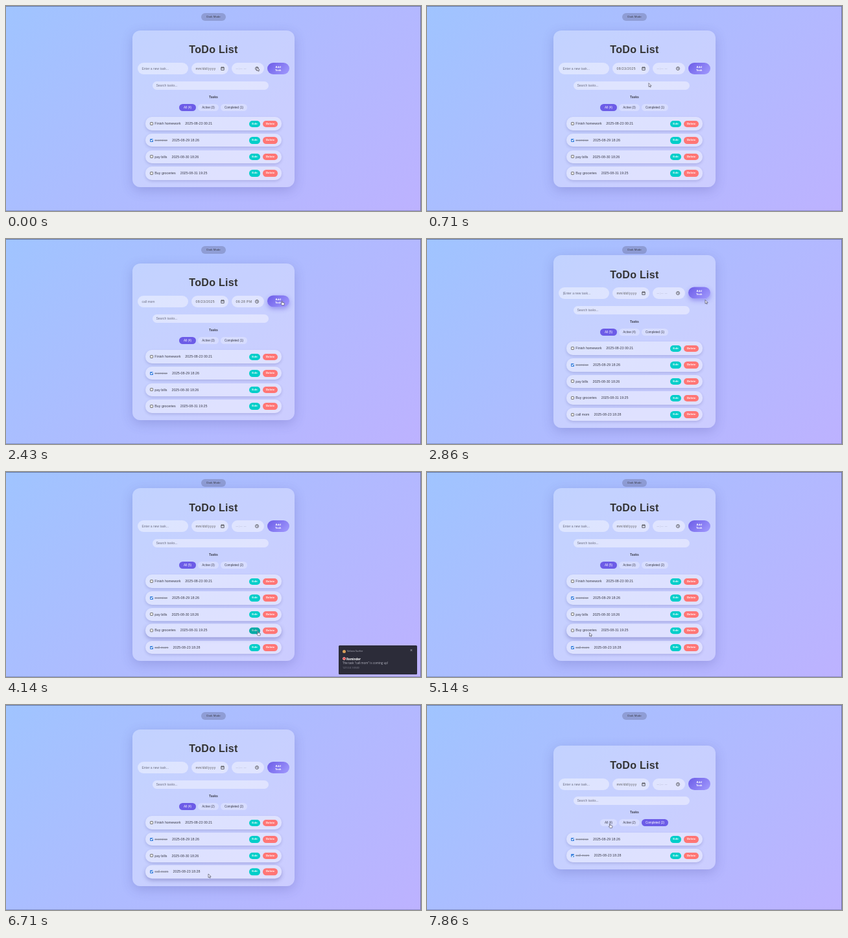
Animation of 640x318 px, one loop 8 s. Source, as an HTML page:

```html
<!DOCTYPE html>
<html lang="en">
<head>
<meta charset="utf-8">
<title>ToDo List</title>
<style>
html, body { margin: 0; width: 100%; height: 100%; overflow: hidden; }
#stage {
  position: relative; width: 640px; height: 318px; overflow: hidden; white-space: nowrap;
  background: linear-gradient(135deg, #a0c4ff, #bdb2ff);
  font: 5px "Liberation Sans", Arial, sans-serif; color: #3a3b48;
}
#stage div, #stage svg, h1 { position: absolute; box-sizing: border-box; }
.edge { inset: 0; border: solid rgba(40, 50, 90, .5); border-width: 1px 1px 1px 0; border-bottom-color: rgba(40, 50, 90, .3); }
.mode {
  left: 301px; top: 11px; width: 38px; height: 12px; border-radius: 6px;
  background: #8f9dd5; font-size: 4.4px; line-height: 12px; text-align: center;
}
#panel {
  left: 195px; width: 250px; border-radius: 12px;
  background: rgba(248, 249, 255, .33);
  box-shadow: 0 5px 18px rgba(60, 60, 140, .22);
}
h1 {
  margin: 0; left: 0; width: 250px; top: 20.9px; text-align: center;
  font-size: 16px; line-height: 20px; letter-spacing: .3px; color: #333;
}
.field {
  height: 18px; line-height: 18px; border-radius: 9px; padding-left: 6.5px;
  background: rgba(250, 250, 255, .46); color: #6d7085;
}
#task { left: 8px; top: 50.5px; width: 78px; }
#date { left: 91px; top: 50.5px; width: 57px; letter-spacing: .45px; color: #555; }
#time { left: 153px; top: 50.5px; width: 50px; letter-spacing: .45px; color: #555; }
#time.empty { color: #a0a3bd; }
#search { left: 31px; top: 79px; width: 179px; height: 13px; line-height: 13px; padding-left: 5.5px; }
.icon { top: 56.5px; width: 6px; height: 6px; overflow: visible; fill: none; stroke: #444; stroke-width: .8; }
.caption { left: 0; width: 250px; top: 100px; line-height: 6px; text-align: center; font-weight: bold; }
#add {
  left: 207.5px; top: 50px; width: 34.5px; height: 18.5px; border-radius: 9.5px; padding-top: 4.2px;
  background: linear-gradient(135deg, #6c5ce7, #a29bfe); color: #fff;
  font-size: 4.3px; font-weight: bold; line-height: 5px; text-align: center;
}
#add.hover { transform: translateY(-.6px); box-shadow: 0 3px 7px rgba(90, 75, 220, .45); }
.tab {
  top: 114px; height: 11px; line-height: 11px; border-radius: 6px;
  background: rgba(255, 255, 255, .27); font-size: 4.6px; text-align: center;
}
.tab.on { background: #6c5ce7; color: #fff; }
.row {
  left: 20px; width: 210px; height: 20.6px; line-height: 20.6px; border-radius: 10px;
  background: rgba(250, 250, 255, .42); box-shadow: 0 2px 4px rgba(60, 60, 140, .2); font-size: 5.3px;
}
.row.hover { transform: translateY(-.7px); box-shadow: 0 3px 6px rgba(60, 60, 140, .34); }
.row .text { left: 14.3px; }
.row .when { margin-left: 7px; }
.row.done .name { text-decoration: line-through; color: #85889a; }
.box { left: 7.3px; top: 7.8px; width: 5px; height: 5px; border: .7px solid #777; border-radius: 1px; background: #fff; }
.done .box { border: 0; background: #3f84de; }
.done .box::after {
  content: ""; position: absolute; left: 1.7px; top: .5px; width: 1.3px; height: 2.6px;
  border: solid #fff; border-width: 0 .7px .7px 0; transform: rotate(45deg);
}
.btn { top: 5.3px; height: 10.4px; line-height: 10.4px; border-radius: 5.2px; color: #fff; font-size: 4.4px; font-weight: bold; text-align: center; }
.edit { left: 160px; width: 17px; background: #00cec9; }
.del { left: 181px; width: 23px; background: #ff7675; }
.btn.hover { filter: brightness(.82); }
#toast { left: 513px; top: 269px; width: 121px; height: 45px; background: #2c2c39; border-radius: 1.5px; color: #b9bac6; font: 4.5px/6px "Open Sans", sans-serif; }
.app { left: 5.5px; top: 6.5px; width: 5px; height: 5px; border-radius: 50%; background: #d8a05a; }
.pin { left: 6px; top: 18.3px; width: 5px; height: 5px; border-radius: 50%; background: #e5484d; border: 1px solid #f3b0b0; }
#cursor { left: 0; top: 0; width: 8px; height: 10px; overflow: visible; }
#cursor path { fill: #f4f4ff; stroke: #3a3a4a; stroke-width: .6; stroke-linejoin: round; }
</style>
</head>
<body>
<div id="stage">
  <div class="mode">Dark Mode</div>
  <div id="panel">
    <h1>ToDo List</h1>
    <div class="field" id="task"></div>
    <div class="field" id="date"></div>
    <div class="field" id="time"></div>
    <svg class="icon" style="left:135.5px" viewBox="0 0 6 6"><path d="M.8 1.2h4.4v4.2H.8zM.8 2h4.4M1.8 .3v1M4.2 .3v1"/></svg>
    <svg class="icon" style="left:189px" viewBox="0 0 6 6"><path d="M.5 3a2.5 2.5 0 1 0 5 0a2.5 2.5 0 1 0-5 0M3 1.4V3l1 .8"/></svg>
    <div id="add">Add<br>Task</div>
    <div class="field" id="search">Search tasks...</div>
    <div class="caption">Tasks</div>
  </div>
  <div id="toast">
    <div class="app"></div>
    <div style="left:13px;top:6px;font-size:4px">Velora Surfer</div>
    <div style="left:110px;top:5px;font-size:7px">×</div>
    <div class="pin"></div>
    <div style="left:12px;top:17.5px;color:#fff;font-weight:bold">Reminder</div>
    <div style="left:6px;top:24px">The task "call mom" is coming up!</div>
    <div style="left:6px;top:32px;font-size:3.8px;color:#8f909e">127.0.0.1:5500</div>
  </div>
  <svg id="cursor"><path/></svg>
  <div class="edge"></div>
</div>
<script>
const LOOP = 8000, FPS = 7, ROW = 25.6;
const ADDED = 18, CHECKED = 25, DELETED = 41, ACTIVE = 50, COMPLETED = 52;
const TOAST_IN = 22, TOAST_OUT = 32;
const ARROW = "M0 0V5.8L1.4 4.6L2.3 6.5L3.2 6.1L2.4 4.2H4.2Z";
const HAND = "M0 .5Q.6-.3 1.2 .5V2.6L4 3.2Q4.6 3.5 4.4 4.5L3.8 6.8H.6L-1.2 4.4Q-1 3.6 0 4.2Z";
const $ = id => document.getElementById(id);
const panel = $("panel");

function make(parent, cls, text = "", tag = "div") {
  const el = document.createElement(tag);
  el.className = cls;
  el.textContent = text;
  return parent.appendChild(el);
}

const tabs = [["All", 72, 26], ["Active", 101, 32], ["Completed", 136, 41]].map(([label, x, w]) => {
  const el = make(panel, "tab");
  el.style.left = x + "px";
  el.style.width = w + "px";
  return { label, el };
});

// name, due, and the ticks at which it is added, done and removed
const tasks = [
  ["Finish homework", "2025-08-23 00:21", 0, 99, 99],
  ["exercise", "2025-08-29 18:26", 0, 0, 99],
  ["pay bills", "2025-08-30 18:26", 0, 99, 99],
  ["Buy groceries", "2025-08-31 19:25", 0, 99, DELETED],
  ["call mom", "2025-08-23 18:28", ADDED, CHECKED, 99]
].map(([name, when, born, done, gone]) => {
  const el = make(panel, "row");
  make(el, "box");
  const text = make(el, "text");
  make(text, "name", name, "span");
  make(text, "when", when, "span");
  return { el, born, done, gone, edit: make(el, "btn edit", "Edit"), del: make(el, "btn del", "Delete") };
});

// tick, x, y
const path = [
  [0, 387, 95], [3, 376, 124], [6, 330, 118], [9, 252, 107], [10, 244, 98], [14, 250, 100],
  [17, 425, 96], [18, 424, 95], [20, 429, 94.5], [23, 300, 200], [25, 225, 271], [29, 388, 247],
  [32, 388, 247], [36, 250.5, 249], [39, 404, 244], [41, 404, 244], [45, 312, 262],
  [47, 312, 262], [50, 312, 156], [52, 350, 181], [55, 281.5, 184], [56, 281.5, 184]
];

function pointer(k) {
  const i = path.findIndex(p => p[0] > k);
  const [a, ax, ay] = path[i - 1], [b, bx, by] = path[i];
  const u = (k - a) / (b - a), e = u * u * (3 - 2 * u);
  return [ax + (bx - ax) * e, ay + (by - ay) * e];
}

const within = (v, lo, size) => v >= lo && v <= lo + size;

function drawForm(k) {
  const typed = k < ADDED ? "call mom".slice(0, Math.max(0, (k - 9) * 2)) : "";
  const focus = k >= ADDED && k < 23 ? "|" : "";
  const timed = k >= 6 && k < ADDED;
  $("task").textContent = typed || focus + "Enter a new task...";
  $("date").textContent = k >= 3 && k < ADDED ? "08/23/2025" : "mm/dd/yyyy";
  $("time").textContent = timed ? "06:28 PM" : "--:-- --";
  $("time").classList.toggle("empty", !timed);
}

function drawList(k, mx, my) {
  const filter = k >= COMPLETED ? 2 : k >= ACTIVE ? 1 : 0;
  const alive = tasks.filter(t => k >= t.born && k < t.gone);
  const groups = [alive, alive.filter(t => k < t.done), alive.filter(t => k >= t.done)];
  const shown = groups[filter];
  const height = 140.6 + ROW * shown.length, top = 159 - height / 2;
  const x = mx - 195, y = my - top;
  let hand = false;

  panel.style.top = top + "px";
  panel.style.height = height + "px";
  tabs.forEach(({ label, el }, i) => {
    el.textContent = `${label} (${groups[i].length})`;
    el.classList.toggle("on", i === filter);
    hand ||= within(y, 114, 11) && within(x, el.offsetLeft, el.offsetWidth);
  });
  tasks.forEach(t => {
    const i = shown.indexOf(t);
    t.el.style.display = i < 0 ? "none" : "";
    if (i < 0) return;
    const rowTop = 134.8 + ROW * i;
    const over = within(y, rowTop, 20.6) && within(x, 20, 210);
    const onEdit = over && within(x, 180, 17), onDel = over && within(x, 201, 23);
    t.el.style.top = rowTop + "px";
    t.el.classList.toggle("done", k >= t.done);
    t.el.classList.toggle("hover", over);
    t.edit.classList.toggle("hover", onEdit);
    t.del.classList.toggle("hover", onDel);
    hand ||= onEdit || onDel;
  });
  const onAdd = within(x, 207, 35) && within(y, 50, 20.5);
  $("add").classList.toggle("hover", onAdd);
  return hand || onAdd && y < 68;
}

function drawToast(k) {
  const out = Math.max(0, k - TOAST_OUT + 1);
  $("toast").style.display = k >= TOAST_IN && out < 4 ? "" : "none";
  $("toast").style.transform = `translateX(${out * 32}px)`;
}

let last = -1;
function frame(now) {
  const k = Math.floor((now % LOOP) * FPS / 1000 + .05) % (LOOP * FPS / 1000);
  if (k !== last) {
    last = k;
    const [x, y] = pointer(k);
    drawForm(k);
    drawToast(k);
    const hand = drawList(k, x, y);
    $("cursor").firstElementChild.setAttribute("d", hand ? HAND : ARROW);
    $("cursor").style.transform = `translate(${x}px, ${y}px)`;
  }
  requestAnimationFrame(t => frame(Math.max(0, t - start)));
}
const start = performance.now();
frame(0);
</script>
</body>
</html>
```
